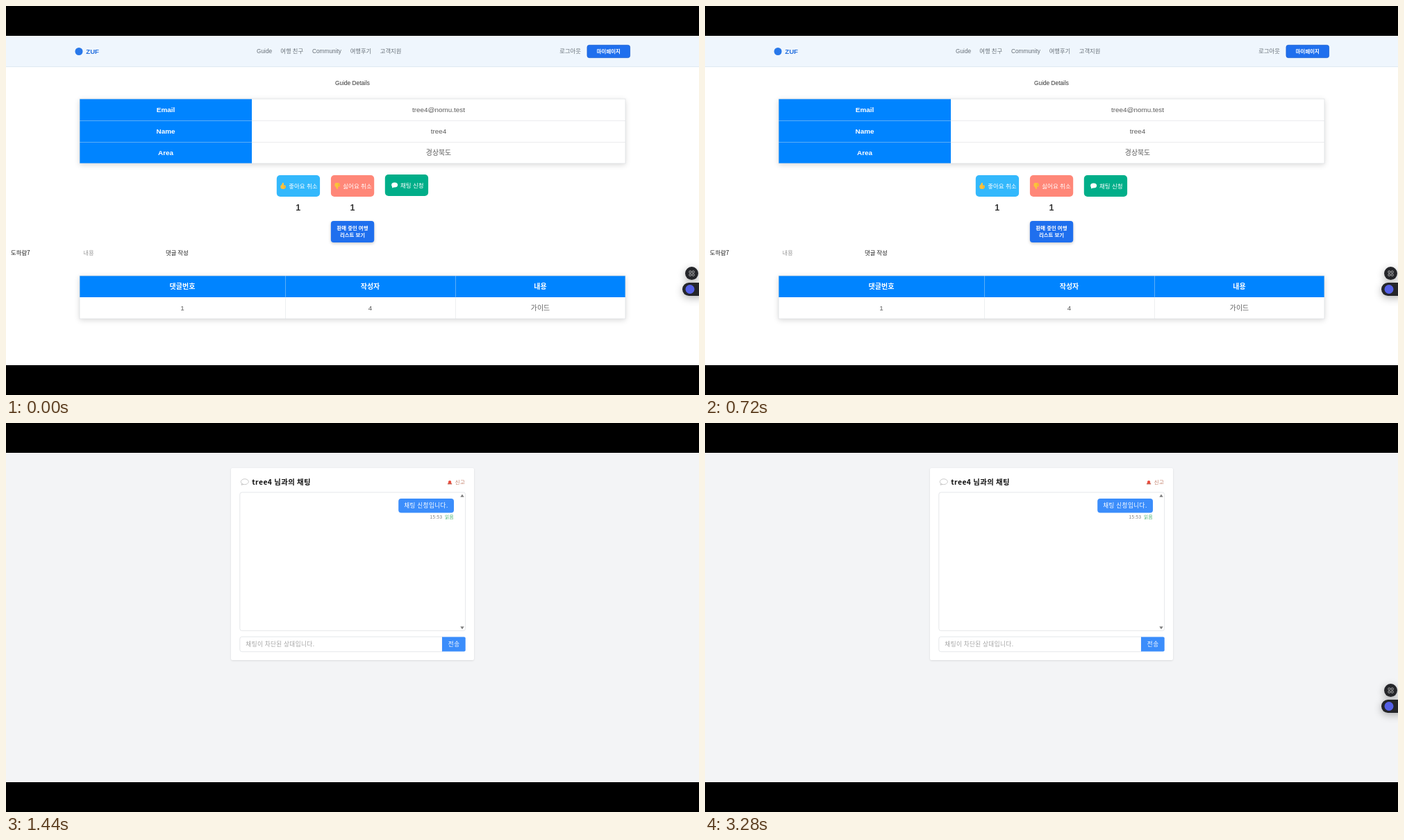
Animation of 998x561 px, one loop 3400 ms. Source, as an HTML page with a canvas:

```html
<!DOCTYPE html>
<html lang="ko">
<head>
<meta charset="utf-8">
<title>Guide chat</title>
<style>
  html, body { margin: 0; width: 100%; height: 100%; overflow: hidden; background: #000; }
  canvas { display: block; width: 998px; height: 561px; }
</style>
</head>
<body>
<canvas id="stage"></canvas>
<script>
const W = 998, H = 561, LOOP = 3400;
const CHAT_AT = 1080, BLOCKED_AT = 1440, WIDGET_AT = 2240;
const HOVER_END = 360, HOVER_FADE = 240;

const KR = '"Noto Sans CJK KR", "Noto Sans CJK JP", "Noto Sans CJK", sans-serif';
const SANS = '"Liberation Sans", ' + KR;
const BLUE = '#0084ff', ROYAL = '#1f6fee', SKY = '#3b8dfb';

const canvas = document.getElementById('stage');
const ctx = canvas.getContext('2d');
const dpr = window.devicePixelRatio || 1;
canvas.width = W * dpr;
canvas.height = H * dpr;
ctx.scale(dpr, dpr);

function rect(x, y, w, h, color) {
  ctx.fillStyle = color;
  ctx.fillRect(x, y, w, h);
}

function box(x, y, w, h, radius, fill, stroke) {
  ctx.beginPath();
  ctx.roundRect(x, y, w, h, radius);
  if (fill) { ctx.fillStyle = fill; ctx.fill(); }
  if (stroke) { ctx.strokeStyle = stroke; ctx.lineWidth = 0.8; ctx.stroke(); }
}

function shadowed(color, blur, dy, draw) {
  ctx.save();
  ctx.shadowColor = color;
  ctx.shadowBlur = blur * dpr;
  ctx.shadowOffsetY = dy * dpr;
  draw();
  ctx.restore();
}

function disc(x, y, rx, color, ry = rx) {
  ctx.beginPath();
  ctx.ellipse(x, y, rx, ry, 0, 0, Math.PI * 2);
  ctx.fillStyle = color;
  ctx.fill();
}

// y is the visual middle of the line
function text(str, x, y, size, color, { align = 'center', weight = 400, font = SANS, gap = 0 } = {}) {
  ctx.font = `${weight} ${size}px ${font}`;
  ctx.letterSpacing = gap + 'px';
  ctx.textAlign = align;
  ctx.fillStyle = color;
  ctx.fillText(str, x, y + size * 0.37);
}

function thumb(x, y, dir) {
  ctx.save();
  ctx.translate(x, y);
  ctx.scale(1, dir);
  ctx.beginPath();
  ctx.moveTo(-3.8, 0);
  ctx.quadraticCurveTo(-1.3, -1.6, -1, -4.4);
  ctx.quadraticCurveTo(0.9, -5.2, 1, -2.8);
  ctx.lineTo(0.8, -1);
  ctx.lineTo(3, -0.8);
  ctx.quadraticCurveTo(4.3, 0, 3.7, 2.4);
  ctx.quadraticCurveTo(3, 4.5, 1, 4.5);
  ctx.lineTo(-2, 4.3);
  ctx.quadraticCurveTo(-4.2, 3.4, -3.8, 0);
  ctx.fillStyle = '#fbc23c';
  ctx.fill();
  ctx.strokeStyle = '#e59a2b';
  ctx.lineWidth = 0.5;
  for (const dy of [0.9, 2.6]) {
    ctx.beginPath();
    ctx.moveTo(0.7, dy);
    ctx.lineTo(3.6, dy);
    ctx.stroke();
  }
  ctx.restore();
}

function triangle(x, y, dir) {
  ctx.beginPath();
  ctx.moveTo(x - 2.7, y + 2 * dir);
  ctx.lineTo(x + 2.7, y + 2 * dir);
  ctx.lineTo(x, y - 2 * dir);
  ctx.closePath();
  ctx.fillStyle = '#7d7d7d';
  ctx.fill();
}

function header() {
  rect(0, 43, W, 45, '#eff6fd');
  rect(0, 87.3, W, 0.8, '#d9e4ef');
  disc(105, 65.5, 5.5, '#2878ea');
  text('ZUF', 115.3, 65.5, 9.6, '#2470df', { align: 'left', weight: 700 });
  const nav = [['Guide', 361], ['여행 친구', 395.3], ['Community', 441], ['여행후기', 495.7],
    ['고객지원', 538.8], ['로그아웃', 797.3]];
  for (const [label, x] of nav) text(label, x, 65.3, 8.3, '#687078', { align: 'left' });
  box(837, 56.4, 61.6, 18.2, 3, ROYAL, '#1a5fd0');
  text('마이페이지', 867.8, 65.6, 7.4, '#fff', { weight: 700 });
}

function tableBase(y, h) {
  shadowed('rgba(0,0,0,0.16)', 8, 2, () => rect(106, y, 786, h, '#fff'));
}

function frameTable(y, h) {
  ctx.strokeStyle = '#dcdfe3';
  ctx.lineWidth = 0.7;
  ctx.strokeRect(106, y, 786, h);
}

function detailTable() {
  tableBase(134, 93);
  rect(106, 134, 248, 93, BLUE);
  for (const y of [165, 196]) {
    rect(106, y, 248, 0.8, '#72b8f6');
    rect(354, y, 538, 0.8, '#e6e8ea');
  }
  const rows = [['Email', 'tree4@nomu.test'], ['Name', 'tree4'], ['Area', '경상북도']];
  rows.forEach(([key, value], i) => {
    const y = 149.4 + i * 31;
    text(key, 230, y, 9.9, '#fff', { weight: 700 });
    text(value, 623, y, 9.9, '#5c5c5c');
  });
  frameTable(134, 93);
}

function commentTable() {
  tableBase(389, 62);
  rect(106, 389, 786, 31, BLUE);
  for (const x of [402, 647]) {
    rect(x, 389, 0.8, 31, '#72b8f6');
    rect(x, 420, 0.8, 31, '#e9ebed');
  }
  const cols = [['댓글번호', '1', 254], ['작성자', '4', 524.5], ['내용', '가이드', 769.5]];
  for (const [head, cell, x] of cols) {
    text(head, x, 404.3, 10, '#fff', { weight: 700 });
    text(cell, x, 435.6, 9.9, '#5c5c5c');
  }
  frameTable(389, 62);
}

function voteButton(x, color, label, dir) {
  box(x, 244, 62.3, 31, 5, color);
  thumb(x + 9.3, 259.4, dir);
  text(label, x + 17.4, 259.5, 8.5, '#fff', { align: 'left', weight: 500 });
  text('1', x + 31, 290, 12.5, '#333', { weight: 700 });
}

function chatButton(lift) {
  ctx.save();
  ctx.translate(0, -lift);
  box(545.8, 244, 62.3, 31, 5, '#00ae89');
  disc(559.6, 259.1, 4.5, '#fff', 3.5);
  ctx.beginPath();
  ctx.moveTo(556.2, 260);
  ctx.lineTo(556, 263.4);
  ctx.lineTo(559.5, 262);
  ctx.fill();
  text('채팅 신청', 568, 259.4, 8.5, '#fff', { align: 'left', weight: 500 });
  ctx.restore();
}

function widget() {
  shadowed('rgba(0,0,0,0.3)', 12, 3, () => {
    disc(987.5, 385.6, 9.5, '#25262a');
    box(974, 399, 34, 19, 9.5, '#25262a');
  });
  for (const x of [983.9, 988.2]) {
    for (const y of [382, 386.3]) box(x, y, 3, 3, 1, null, '#c4c4c6');
  }
  disc(985, 408.5, 6.5, '#5560e6');
}

function guidePage(t) {
  rect(0, 43, W, 475, '#fff');
  header();
  text('Guide Details', 499, 111, 8.3, '#333');
  detailTable();
  voteButton(389.8, '#33b8fc', '좋아요 취소', 1);
  voteButton(467.9, '#ff8778', '싫어요 취소', -1);
  const p = Math.min(1, Math.max(0, (t - HOVER_END) / HOVER_FADE));
  chatButton((1 - p) ** 2);
  shadowed('rgba(0,0,0,0.22)', 4, 1.5, () => box(467.9, 310, 62.3, 31, 4, ROYAL));
  text('판매 중인 여행', 499, 320.4, 7.4, '#fff', { weight: 700 });
  text('리스트 보기', 499, 330.6, 7.4, '#fff', { weight: 700 });
  const left = { align: 'left', font: KR };
  text('도하람7', 7, 356.2, 8.4, '#222', left);
  text('내용', 111.3, 356.2, 8.4, '#9a9a9a', left);
  text('댓글 작성', 230, 356.2, 8.4, '#222', left);
  commentTable();
  widget();
}

function speechIcon() {
  ctx.beginPath();
  ctx.ellipse(343.8, 84.7, 5.5, 4, 0, 0, Math.PI * 2);
  ctx.moveTo(339.6, 87.2);
  ctx.lineTo(339, 89.3);
  ctx.lineTo(342, 88.5);
  ctx.strokeStyle = '#b4b4b4';
  ctx.lineWidth = 0.7;
  ctx.stroke();
}

function sirenIcon() {
  box(637, 83, 4.2, 4.6, [2, 2, 0, 0], '#ec4a3c');
  rect(636, 87, 6.2, 1.4, '#c0604f');
}

function chatPage(t) {
  const left = { align: 'left', font: KR, gap: 0.43 };
  rect(0, 43, W, 475, '#f3f4f6');
  shadowed('rgba(0,0,0,0.12)', 2.5, 0.8, () => box(324, 65, 350, 277, 2, '#fff'));

  speechIcon();
  text('tree4 님과의 채팅', 354.3, 84.7, 10.4, '#111', { ...left, weight: 700 });
  sirenIcon();
  text('신고', 646.8, 85, 7.4, '#c07a64', left);

  box(336.8, 100, 324.8, 199.6, 3, '#fff', '#dfe1e5');
  triangle(657, 104.8, 1);
  triangle(657, 295.4, -1);
  box(565.2, 109, 79.8, 20.4, 4, SKY);
  text('채팅 신청입니다.', 573.2, 119.3, 8.6, '#fff', left);
  text('15:53', 610.6, 135.3, 6.5, '#777', { ...left, gap: 0.3 });
  text('읽음', 632, 135.3, 6.6, '#3fae68', left);

  box(336.8, 308.3, 291.5, 21.5, [3, 0, 0, 3], '#fff', '#dfe1e5');
  const hint = t < BLOCKED_AT ? '메시지를 입력하세요' : '채팅이 차단된 상대입니다.';
  text(hint, 345.3, 319.3, 8.6, '#a3a3a3', left);
  box(628, 308.5, 33.7, 21, [0, 2, 2, 0], SKY);
  text('전송', 636.8, 319.2, 8.6, '#fff', left);

  if (t >= WIDGET_AT) widget();
}

function draw() {
  const t = performance.now() % LOOP;
  rect(0, 0, W, H, '#000');
  ctx.save();
  ctx.beginPath();
  ctx.rect(0, 43, W, 475);
  ctx.clip();
  if (t < CHAT_AT) guidePage(t);
  else chatPage(t);
  ctx.restore();
  requestAnimationFrame(draw);
}
draw();
</script>
</body>
</html>
```
